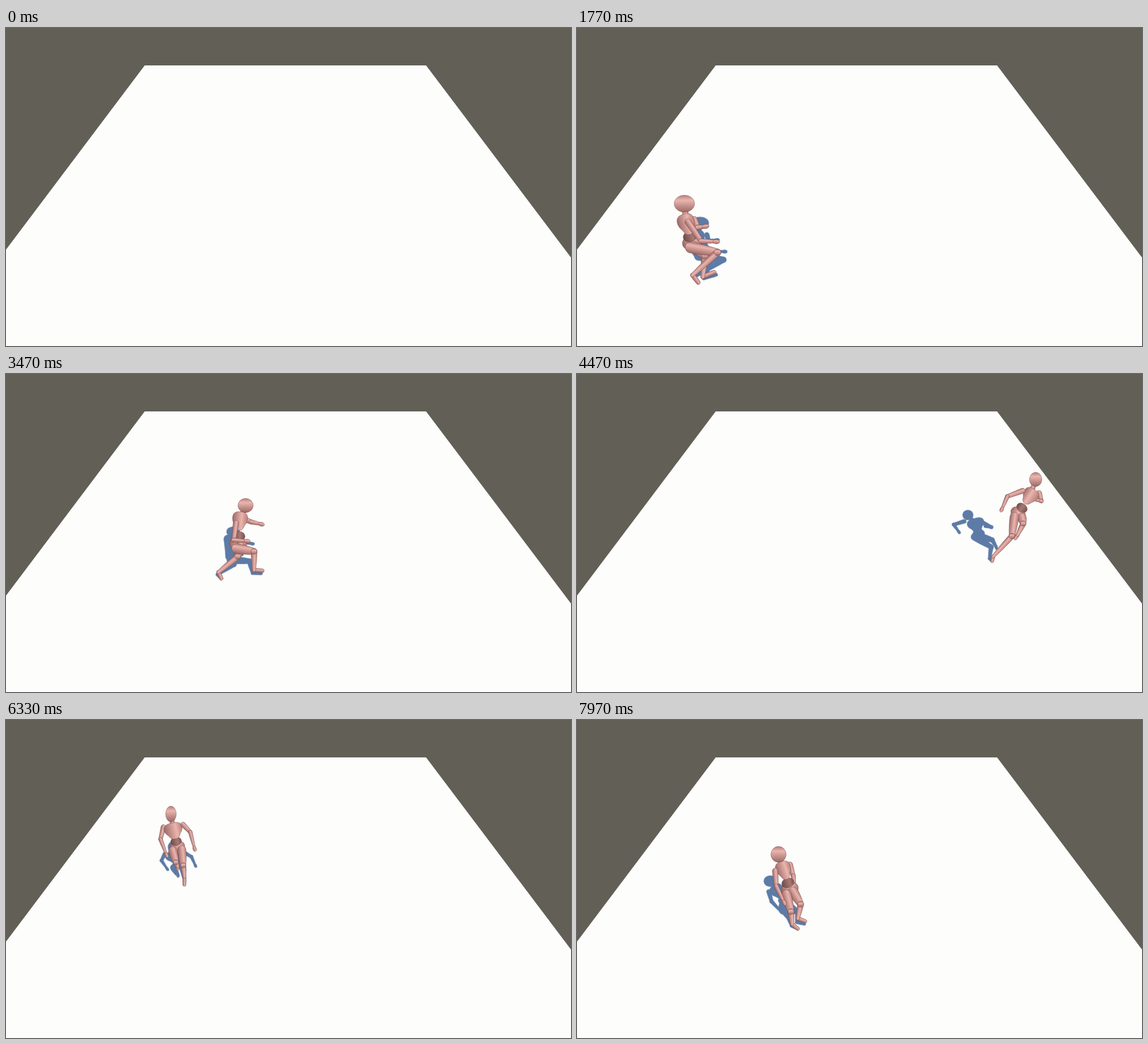
These frames come from a looping animation (998x561 px, 8000 ms). An HTML page with a canvas:

```html
<!DOCTYPE html>
<html lang="en">
<head>
<meta charset="utf-8">
<title>Mannequin run</title>
<style>
html, body { margin: 0; width: 100%; height: 100%; overflow: hidden; background: #625f57; }
canvas { display: block; }
</style>
</head>
<body>
<canvas id="stage" width="998" height="561"></canvas>
<script>
const ctx = document.getElementById('stage').getContext('2d', { alpha: false });
const LOOP = 8000, STEP = 100 / 3;
const mix = (a, b, u) => a + (b - a) * u;
const mid = (p, q, u = 0.5) => [mix(p[0], q[0], u), mix(p[1], q[1], u)];

// Apparent size grows as the figure nears the camera.
const sizeAt = y => 0.72 + (y - 112) * 0.0018;

// Joints: head, chest, pelvis, then shoulder, elbow, hand, knee, ankle, toe
// of the far side and of the near side. Stored relative to the pelvis.
function pose(rx, ry, xy) {
  const px = xy[4], py = xy[5], s = sizeAt(py), joints = [];
  for (let i = 0; i < xy.length; i += 2) joints.push([(xy[i] - px) / s, (xy[i + 1] - py) / s]);
  return { rx: rx / s, ry: ry / s, joints, second: false };
}
function otherStep(p, mirror) {
  const j = p.joints;
  const joints = [...j.slice(0, 3), ...j.slice(9), ...j.slice(3, 9)]
    .map(([x, y]) => [mirror ? -x : x, y]);
  return { ...p, joints, second: true };
}

const crouch = pose(18, 15, [189.5, 310, 193, 345, 203, 378,
  207, 338, 213, 352, 227, 350, 226, 402, 222, 439, 242, 431,
  196, 342, 219, 376, 246, 377, 248, 396, 204, 436, 214, 449]);
const stride = pose(13.5, 12.5, [423, 232, 413, 258, 410, 299,
  420, 256, 433, 261, 451, 265, 409, 322, 375, 350, 380, 361,
  406, 263, 402, 293, 426, 295, 438, 313, 438, 346, 453, 347]);
const sprint = pose(11, 12.5, [810, 186, 800, 215, 779, 246,
  816, 210, 820, 224, 812, 222, 788, 264, 778, 284, 774, 290,
  787, 206, 760, 216, 750, 239, 768, 286, 735, 322, 733, 330]);
const back = pose(9, 10.5, [588, 68, 600, 91, 604, 112,
  606, 88, 614, 105, 606, 104, 585, 130, 611, 138, 617, 148,
  595, 92, 590, 109, 570, 112, 600, 143, 606, 164, 599, 168]);
const front = pose(9.5, 14, [288, 170, 294, 199, 303, 228,
  276, 194, 272, 217, 286, 245, 302, 255, 306, 260, 306, 262,
  311, 188, 325, 200, 336, 230, 315, 264, 318, 292, 318, 306]);
const idle = pose(13.5, 14, [356, 237, 365, 264, 376, 298,
  376, 255, 382, 275, 384, 292, 395, 325, 390, 350, 403, 355,
  350, 266, 352, 293, 366, 322, 378, 338, 380, 360, 390, 368]);
const stride2 = otherStep(stride), back2 = otherStep(back), front2 = otherStep(front, true);

// Time, pose, pelvis position.
const keys = [
  [1080, stride, -90, 485], [1300, stride2, 10, 465], [1530, stride, 120, 418],
  [1766, crouch, 203, 378], [1930, crouch, 214, 364], [2330, stride, 238, 366],
  [2620, stride2, 260, 363], [2900, stride, 296, 350], [3190, stride2, 348, 325],
  [3466, stride, 410, 299], [3720, stride2, 500, 282], [3970, stride, 596, 268],
  [4220, stride2, 693, 256], [4466, sprint, 779, 246], [4540, sprint, 786, 238],
  [4690, back, 770, 209], [4930, back2, 700, 155], [5166, back, 604, 112],
  [5410, back2, 488, 107], [5650, back, 392, 122], [5850, back2, 332, 147],
  [6070, front2, 304, 184], [6333, front, 303, 228], [6590, front2, 311, 254],
  [6850, idle, 325, 286], [7100, stride, 350, 300], [7350, stride2, 383, 303],
  [7600, idle, 380, 302], [7770, idle, 376, 299], [8000, idle, 376, 298]
];

function slope(i, c) {
  const a = keys[Math.max(i - 1, 0)], b = keys[Math.min(i + 1, keys.length - 1)];
  return (b[c] - a[c]) / (b[0] - a[0]);
}
function along(i, u, c) {
  const a = keys[i], b = keys[i + 1], d = b[0] - a[0], v = 1 - u;
  return a[c] * v * v * (1 + 2 * u) + b[c] * u * u * (1 + 2 * v)
    + d * u * v * (slope(i, c) * v - slope(i + 1, c) * u);
}

function figureAt(t) {
  let i = 0;
  while (i < keys.length - 2 && keys[i + 1][0] <= t) i++;
  const [t0, a] = keys[i], [t1, b] = keys[i + 1];
  const u = (t - t0) / (t1 - t0);
  const x = along(i, u, 2), y = along(i, u, 3), s = sizeAt(y);
  const joints = a.joints.map((p, n) => {
    const q = mid(p, b.joints[n], u);
    return [x + q[0] * s, y + q[1] * s];
  });
  if (a.second !== b.second) {
    const knee = a.second ? 12 : 6, lift = Math.sin(Math.PI * u) * s;
    joints[knee][1] -= 4 * lift;
    joints[knee + 1][1] -= 16 * lift;
    joints[knee + 2][1] -= 13 * lift;
  }
  return { joints, s, rx: mix(a.rx, b.rx, u) * s, ry: mix(a.ry, b.ry, u) * s };
}

let flat = false;

function paint(angle, r, dark) {
  ctx.lineWidth = 0.8;
  if (flat) {
    ctx.fillStyle = '#5d7ba6';
    ctx.strokeStyle = 'rgba(93,123,166,0.4)';
    ctx.lineWidth = 1.6;
  } else {
    // Highlight shifts to the lit side of the rotated part.
    const lit = Math.sin(angle) * -0.45 + Math.cos(angle) * -0.85;
    const g = ctx.createLinearGradient(0, -r, 0, r);
    g.addColorStop(0, dark ? '#765350' : '#b67f7a');
    g.addColorStop(0.5 + 0.24 * lit, dark ? '#a87974' : '#ebb5af');
    g.addColorStop(1, dark ? '#6b4a49' : '#9b6864');
    ctx.fillStyle = g;
    ctx.strokeStyle = 'rgba(105,62,60,0.55)';
  }
  ctx.fill();
  ctx.stroke();
}

function part(p, angle, r, path, dark) {
  ctx.save();
  ctx.translate(p[0], p[1]);
  ctx.rotate(angle);
  ctx.beginPath();
  path();
  ctx.closePath();
  paint(angle, r, dark);
  ctx.restore();
}
const heading = (p, q) => Math.atan2(q[1] - p[1], q[0] - p[0]);

function oval(p, rx, ry, angle = 0, dark = false) {
  part(p, angle, ry, () => ctx.ellipse(0, 0, rx, ry, 0, 0, Math.PI * 2), dark);
}

function limb(p, q, r1, r2, bulge = 1) {
  const len = Math.hypot(q[0] - p[0], q[1] - p[1]);
  const w = mix(r1, r2, 0.4) * bulge;
  part(p, heading(p, q), Math.max(r1, r2), () => {
    ctx.arc(0, 0, r1, Math.PI / 2, Math.PI * 1.5);
    ctx.quadraticCurveTo(len * 0.4, -w, len, -r2);
    ctx.arc(len, 0, r2, -Math.PI / 2, Math.PI / 2);
    ctx.quadraticCurveTo(len * 0.4, w, 0, r1);
  });
}

function arm(j, n, s) {
  const [sh, el, ha] = j.slice(n, n + 3);
  limb(sh, el, 4.7 * s, 3.4 * s, 1.05);
  oval(el, 3.5 * s, 3.5 * s);
  limb(el, mid(el, ha, 0.85), 3.7 * s, 2.3 * s, 1.1);
  oval(ha, 5.2 * s, 3.3 * s, heading(el, ha));
}

function leg(j, n, hip, s) {
  const [kn, an, toe] = j.slice(n + 3, n + 6);
  limb(hip, kn, 8 * s, 5.2 * s, 1.2);
  limb(an, toe, 3.3 * s, 3 * s, 1.1);
  limb(kn, an, 5 * s, 2.8 * s, 1.2);
  oval(kn, 5 * s, 4.8 * s);
}

function body({ joints: j, s, rx, ry }) {
  const [head, chest, pelvis] = j, far = j[3], near = j[9];
  const spine = heading(chest, pelvis);
  const half = Math.max(13 * s, Math.hypot(near[0] - far[0], near[1] - far[1]) * 0.48);
  const hip = k => [pelvis[0] + (near[0] - far[0]) * 0.23 * k,
    pelvis[1] + (near[1] - far[1]) * 0.23 * k + 7 * s];

  arm(j, 3, s);
  oval(pelvis, 11 * s, 14.5 * s, spine);
  leg(j, 3, hip(-1), s);
  leg(j, 9, hip(1), s);
  oval(mid(pelvis, chest, 0.32), 8 * s, 10.5 * s, spine, true);
  limb(chest, mid(chest, head, 0.7), 5 * s, 4 * s);
  part(chest, spine, half, () => {
    ctx.moveTo(-14 * s, 0);
    ctx.bezierCurveTo(-16 * s, -half * 1.15, 0, -half * 1.15, 8 * s, -half * 0.65);
    ctx.bezierCurveTo(13 * s, -half * 0.5, 17 * s, -half * 0.4, 17 * s, 0);
    ctx.bezierCurveTo(17 * s, half * 0.4, 13 * s, half * 0.5, 8 * s, half * 0.65);
    ctx.bezierCurveTo(0, half * 1.15, -16 * s, half * 1.15, -14 * s, 0);
  });
  oval(head, rx, ry);
  arm(j, 9, s);
}

function shadowOf(fig) {
  const j = fig.joints, [x, y] = j[2];
  const ground = Math.max(j[7][1], j[8][1], j[13][1], j[14][1]);
  const dx = 0.2 - (x - 203) * 0.00179, dy = 0.63 - (y - 112) * 0.00145;
  const joints = j.map(([px, py]) => {
    const h = ground - py;
    return [px + h * dx, py + h * dy];
  });
  return { joints, s: fig.s * 0.78, rx: fig.rx * 0.85, ry: fig.ry * 0.7 };
}

function floor() {
  ctx.fillStyle = '#625f57';
  ctx.fillRect(0, 0, 998, 561);
  ctx.fillStyle = '#fdfdfc';
  ctx.beginPath();
  ctx.moveTo(245, 66);
  ctx.lineTo(742, 66);
  ctx.lineTo(998, 405);
  ctx.lineTo(998, 561);
  ctx.lineTo(0, 561);
  ctx.lineTo(0, 391);
  ctx.fill();
}

function draw(t) {
  floor();
  if (t < keys[0][0]) return;
  const fig = figureAt(t);
  flat = true;
  body(shadowOf(fig));
  flat = false;
  body(fig);
}

let shown = -1;
function frame() {
  const step = Math.floor(performance.now() % LOOP / STEP);
  if (step !== shown) {
    shown = step;
    draw(step * STEP);
  }
  requestAnimationFrame(frame);
}
frame();
</script>
</body>
</html>
```
